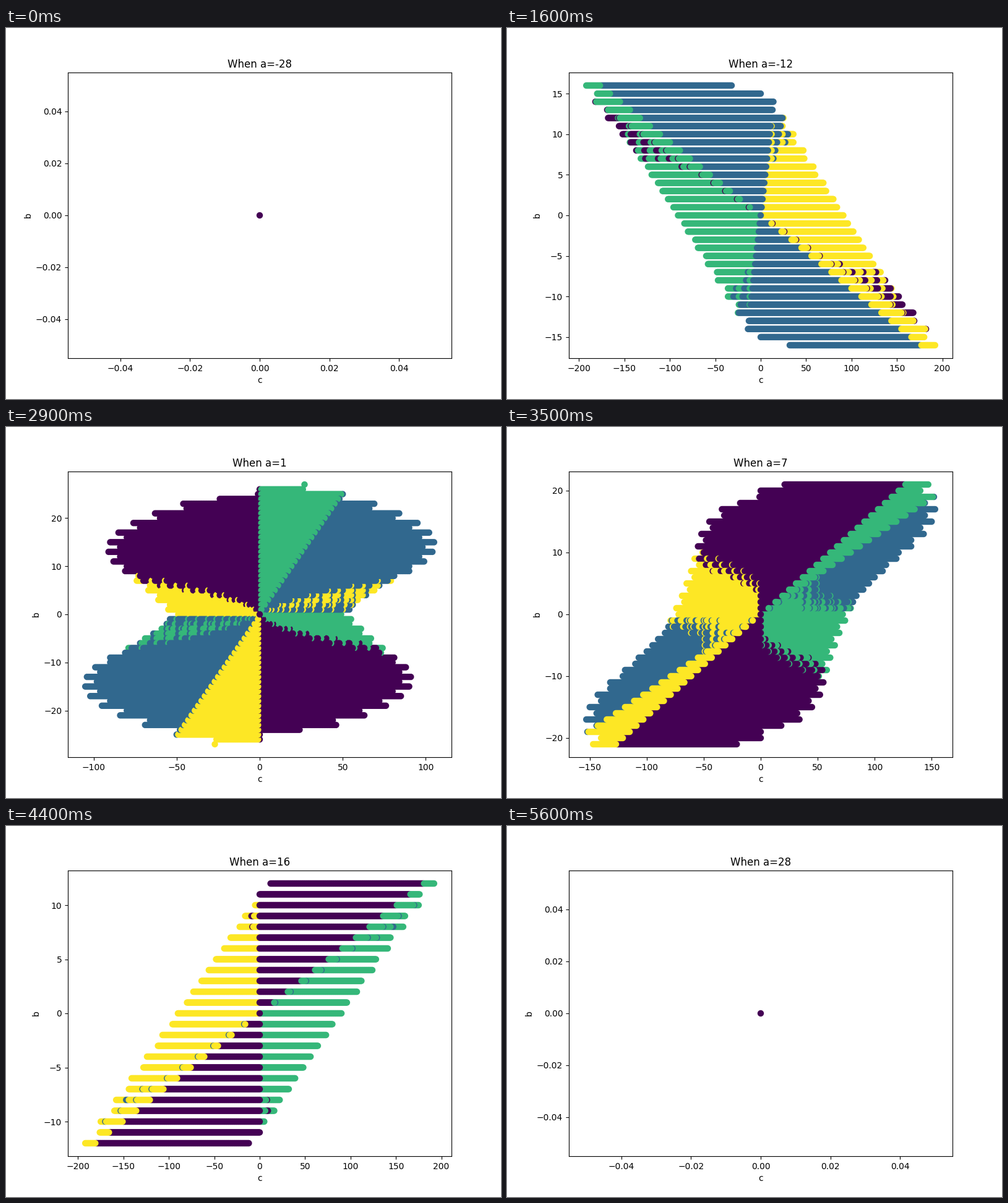
A matplotlib script for the animation above (5700 ms loop, 800 by 600 pixels).

```python
import matplotlib.pyplot as plt
import numpy as np
from matplotlib.animation import FuncAnimation

# Slices through a ball of the discrete Heisenberg group, coloured by the
# last generator of the shortlex geodesic reaching each element.
RADIUS = 28
STEPS = [(1, 0), (-1, 0), (0, 1), (0, -1)]
LAST_HEAD = 0o30  # the outermost sphere stops after this three-letter prefix


def grow_ball():
    """Breadth-first search; returns {a: array of (c, b, generator)}."""
    slices = {a: [] for a in range(-RADIUS, RADIUS + 1)}
    slices[0].append((0, 0, 0))
    seen = {(0, 0, 0)}
    layer = [(0, 0, 0, 0)]
    for depth in range(1, RADIUS + 1):
        following = []
        for a, b, c, head in layer:
            if depth == RADIUS and head > LAST_HEAD:
                break
            for gen, (da, db) in enumerate(STEPS):
                point = (a + da, b + db, c + a * db)
                if point in seen:
                    continue
                seen.add(point)
                prefix = 4 * head + gen if depth <= 3 else head
                following.append((*point, prefix))
                slices[point[0]].append((point[2], point[1], gen))
        layer = following
    return {a: np.array(rows) for a, rows in slices.items()}


ball = grow_ball()
fig, ax = plt.subplots(figsize=(8, 6), dpi=100)


def draw(frame):
    a = frame - RADIUS
    c, b, gen = ball[a][::-1].T  # elements nearest the identity end on top
    ax.clear()
    ax.scatter(c, b, c=gen, s=7.5 ** 2, edgecolors="none")
    ax.set_title(f"When a={a}")
    ax.set_xlabel("c")
    ax.set_ylabel("b")


anim = FuncAnimation(fig, draw, frames=2 * RADIUS + 1, interval=100, repeat=True)
plt.show()
```
